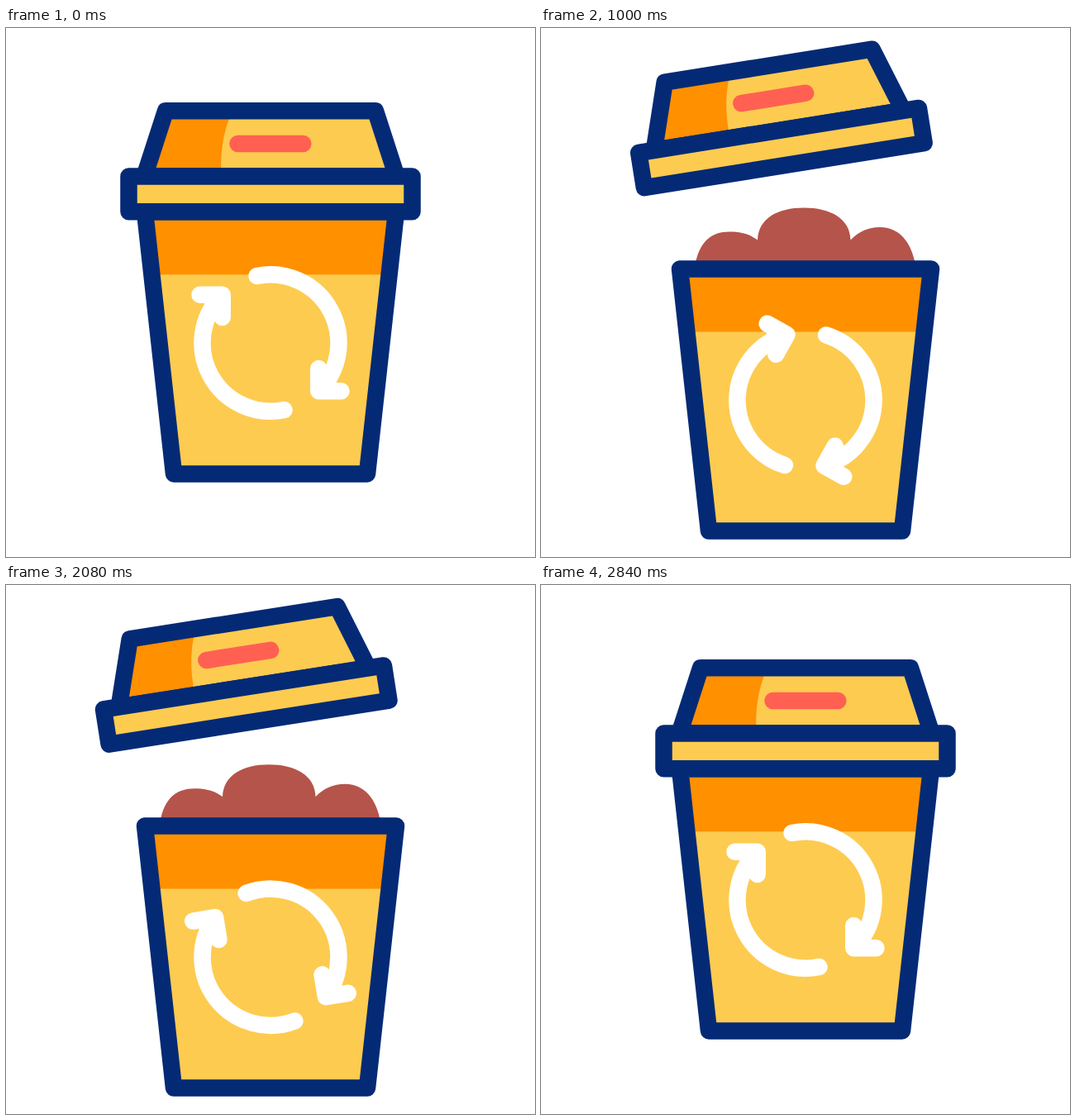
An HTML page that plays this animation: 640 by 640 pixels, repeating every 3.6 s.

```html
<!DOCTYPE html>
<html lang="en">
<head>
<meta charset="utf-8">
<title>Recycling bin</title>
<style>
  html, body { margin: 0; width: 100%; height: 100%; overflow: hidden; background: #fff; }
  svg { display: block; width: 100%; height: 100%; }
  .line { fill: none; stroke: #042a76; stroke-width: 20.5; stroke-linejoin: round; }
  .arrow { fill: none; stroke: #fff; stroke-width: 20.5; stroke-linecap: round; stroke-linejoin: round; }
  .light { fill: #fdcb50; }
  .dark { fill: #ff9000; }
</style>
</head>
<body>
<svg viewBox="0 0 640 640">
  <defs>
    <path id="cup" d="M168 222.2H472L437 539.4H203Z"/>
    <path id="dome" d="M193 100.3H447L472.6 179.5H167.4Z"/>
    <path id="arrow" d="M303.5 300A82.5 82.5 0 0 1 378.3 439.2M378.3 412V439.2H405.5"/>
    <clipPath id="cupClip"><use href="#cup"/></clipPath>
  </defs>
  <g id="bin">
    <g id="waste">
      <path fill="#b5544a" d="M187.5 212C193 189 206 177 228 177C242 177 253 180 262 187
        C263 161 286 148 318 148C350 148 374 161 374.5 187C384 177 396 171.5 410 171.5
        C432 171.5 446 187 452 212V260H187.5Z"/>
    </g>
    <g id="body">
      <use href="#cup" class="light"/>
      <rect class="dark" x="160" y="222" width="320" height="76.3" clip-path="url(#cupClip)"/>
      <use href="#cup" class="line"/>
      <g id="arrows" class="arrow">
        <use href="#arrow"/>
        <use href="#arrow" transform="rotate(180 320 381)"/>
      </g>
    </g>
    <g id="lid">
      <use href="#dome" class="light"/>
      <path class="dark" d="M193 100.3H274Q258 134 260.5 179.5H167.4Z"/>
      <path d="M280.5 140H359.3" stroke="#ff6052" stroke-width="20.5" stroke-linecap="round"/>
      <use href="#dome" class="line"/>
      <rect class="light" x="148.5" y="179.5" width="343" height="42.8"/>
      <rect class="line" x="148.5" y="179.5" width="343" height="42.8"/>
    </g>
  </g>
</svg>
<script>
  const LOOP = 3600;
  const part = id => document.getElementById(id);
  const [bin, waste, body, arrows, lid] = ["bin", "waste", "body", "arrows", "lid"].map(part);

  const ramp = (t, from, to) => Math.min(1, Math.max(0, (t - from) / (to - from)));
  const ease = (t, from, to) => {
    const p = ramp(t, from, to);
    return p * p * (3 - 2 * p);
  };
  const easeOut = (t, from, to) => 1 - (1 - ramp(t, from, to)) ** 3;
  const set = (el, value) => el.setAttribute("transform", value);

  function draw(t) {
    const open = ease(t, 0, 500);
    const shut = ease(t, 2133, 2533);
    const drop = 69.2 * (open - shut);

    // The lid lifts aside, then tips; it straightens before it lands.
    const lidX = -38.5 * (open - shut);
    const lidY = -55.1 * (open - ease(t, 2133, 2467));
    const tilt = -9.05 * (ease(t, 240, 640) - ease(t, 2053, 2403));
    set(lid, `translate(${lidX} ${lidY}) rotate(${tilt} 320 141)`);

    set(body, `translate(0 ${drop})`);
    set(arrows, `rotate(${360 * ease(t, 742, 2223)} 320 381)`);

    const sunk = 92 * (1 - easeOut(t, 330, 1130) + shut);
    set(waste, `translate(0 ${drop + sunk})`);

    // Squash on landing, standing on the floor line.
    const squash = ease(t, 2540, 2740) - ease(t, 2740, 2840);
    const sx = 1 + 0.23 * squash, sy = 1 - 0.15 * squash;
    set(bin, `translate(328 550) scale(${sx} ${sy}) translate(-328 -550)`);
  }

  const start = performance.now();
  function tick() {
    draw((performance.now() - start) % LOOP);
    requestAnimationFrame(tick);
  }
  tick();
</script>
</body>
</html>
```
